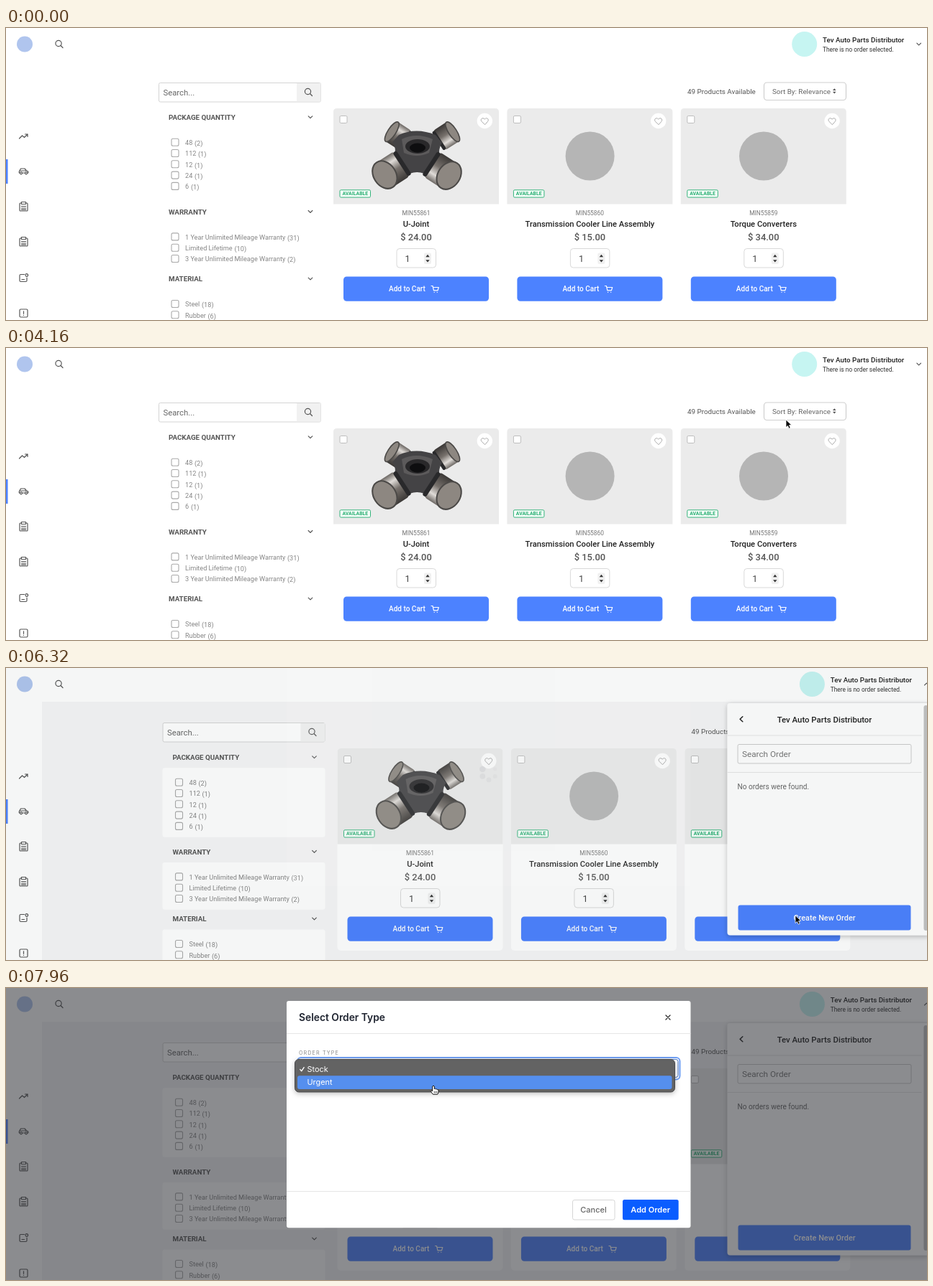
Recreate the animation shown at these times as an HTML page. Size 1280 by 407 pixels, loop 8 s.

```html
<!DOCTYPE html>
<html lang="en">
<head>
<meta charset="utf-8">
<title>Order type selection</title>
<style>
  html, body { margin: 0; height: 100%; overflow: hidden; background: #fff; }
  svg { display: block; width: 100%; height: 100%; }
  text { font-family: Roboto, sans-serif; white-space: pre; }
  .inter { font-family: Inter, sans-serif; }
  .line { fill: none; stroke: #555; stroke-width: 1.2; stroke-linecap: round; stroke-linejoin: round; }
</style>
</head>
<body>
<svg id="stage" viewBox="0 0 1280 407" xmlns="http://www.w3.org/2000/svg"></svg>
<script>
const LOOP = 8000, FRAME = 40;
const BLUE = '#4c82ff';
const COMPANY = 'Tev Auto Parts Distributor';

// Text is placed by the vertical centre of its capitals.
const text = (x, y, size, str, { fill = '#555', w = 400, at = 'start', cls = '', gap = 0 } = {}) =>
  `<text class="${cls}" x="${x}" y="${y + size * .355}" font-size="${size}" font-weight="${w}" fill="${fill}" text-anchor="${at}" letter-spacing="${gap}">${str}</text>`;
const rect = (x, y, w, h, fill, r = 0, stroke = 'none', sw = 1) =>
  `<rect x="${x}" y="${y}" width="${w}" height="${h}" rx="${r}" fill="${fill}" stroke="${stroke}" stroke-width="${sw}"/>`;
const line = (d, x = 0, y = 0, attrs = '') => `<path class="line" d="${d}" transform="translate(${x} ${y})" ${attrs}/>`;
const circle = (x, y, r, fill, attrs = '') => `<circle cx="${x}" cy="${y}" r="${r}" fill="${fill}" ${attrs}/>`;
const group = (id, body, attrs = '') => `<g id="${id}" ${attrs}>${body}</g>`;

const chevron = (x, y) => line('M-2.8-1.4L0 1.4 2.8-1.4', x, y);
const magnifier = (x, y) => circle(x - 1, y - 1, 4.1, 'none', 'class="line"') + line('M2 2L5 5', x, y);

function sidebar() {
  const clipboard = 'M-3-5H-4.5Q-5.5-5-5.5-4V5Q-5.5 6-4.5 6H4.5Q5.5 6 5.5 5V-4Q5.5-5 4.5-5H3M-3-6.5H3V-3.5H-3ZM-3-.5H3M-3 2H3M-3 4.2H3';
  const icons = [
    [151, 'M-6 3L-2-1 1 1.5 5.5-3M2-3H5.5V.5'],
    [200, 'M-5 2H-6.2V0L-4-4H1.5L4-1Q6.3-.7 6.3 1V2H5M-2 2H2M-5.5-1H4M-5 2.3a1.5 1.5 0 1 0 3 0a1.5 1.5 0 1 0-3 0M2 2.3a1.5 1.5 0 1 0 3 0a1.5 1.5 0 1 0-3 0'],
    [249, clipboard], [298, clipboard],
    [348, 'M1-4.5H-4Q-5.5-4.5-5.5-3V4Q-5.5 5.5-4 5.5H3Q4.5 5.5 4.5 4V0M2.5-3.5a1.8 1.8 0 1 0 3.6 0a1.8 1.8 0 1 0-3.6 0M-2.5 2.5H1'],
    [397.5, 'M-4-5.5H4Q5.5-5.5 5.5-4V4Q5.5 5.5 4 5.5H-4Q-5.5 5.5-5.5 4V-4Q-5.5-5.5-4-5.5ZM0-2.7V.8M0 2.8V2.9'],
  ];
  return rect(0, 47, 50, 360, '#fff') + rect(0, 183, 2.5, 34, BLUE) +
    icons.map(([y, d]) => line(d, 24.5, y)).join('');
}

function filters() {
  const section = (y, title, items) => {
    const first = y + 35;
    return rect(212, y + 14.5, 226, items.length * 15.3 + 20, '#fff', 3) +
      text(226, y, 9.75, title, { w: 700 }) + chevron(423, y - .5) +
      items.map(([name, count, width], i) => {
        const row = first + i * 15.3;
        return rect(230, row - 5.5, 10, 10, '#fff', 2, '#aaa', 1.1) +
          text(249, row, 9.15, name, { fill: '#858585' }) +
          text(249 + width, row + 1, 9.15, `(${count})`, { fill: '#858585' });
      }).join('');
  };
  return rect(212.5, 76.5, 225, 26.5, '#fff', 2, '#d4d4d4') + rect(404, 77, 33.5, 25.5, '#f1f1f1') +
    text(218.5, 90, 11.3, 'Search...', { fill: '#666' }) + magnifier(420.5, 89.5) +
    section(124.7, 'PACKAGE QUANTITY', [['48', 2, 13], ['112', 1, 18], ['12', 1, 13], ['24', 1, 13], ['6', 1, 8]]) +
    section(256.4, 'WARRANTY', [['1 Year Unlimited Mileage Warranty', 31, 142], ['Limited Lifetime', 10, 68.5], ['3 Year Unlimited Mileage Warranty', 2, 142]]) +
    section(350, 'MATERIAL', [['Steel', 18, 23], ['Rubber', 6, 31.5]]);
}

// A simplified metal cross joint.
function joint() {
  const cap = (x, y, turn, s, face) => `<g transform="translate(${x} ${y}) rotate(${turn}) scale(${s})">
    ${rect(-13, -20, 31, 40, 'url(#steel)', 5)}${rect(15, -19, 6, 38, '#29292b', 3)}
    <ellipse cx="-10" rx="${face}" ry="20" fill="#8d8781" stroke="#4b4947" stroke-width="2"/></g>`;
  return cap(543, 149, 33, .8, 7) + cap(614, 149, 147, .8, 7) +
    `<path d="M546 149Q570 138 597 149L606 160Q598 172 606 190L590 208Q572 194 551 208L534 188Q546 171 537 159Z" fill="#444345"/>
     <path d="M550 155Q570 145 593 155L588 174Q571 182 553 174Z" fill="#5c5a5b"/>
     <ellipse cx="572" cy="165" rx="17" ry="10" fill="#29282a"/><ellipse cx="572" cy="167" rx="11" ry="6.5" fill="#0e0e10"/>` +
    cap(535, 199, -33, 1.03, 15) + cap(607, 200, 213, 1.03, 15);
}

function product(i, code, name, price) {
  const cart = 'M-5-4.5H-3L-1.5 1.8H4L5.3-2.5H-2.5M-.8 4.3V4.4M3.3 4.3V4.4';
  const picture = i ? circle(115.2, 66.5, 34, '#b5b5b5') : `<g transform="translate(-455 -112)">${joint()}</g>`;
  const c = 115;
  return `<g transform="translate(${455 + i * 241.4} 112)">
    ${rect(0, 0, 230, 282, '#fff', 5)}
    <path d="M0 133.5V5Q0 0 5 0H225Q230 0 230 5V133.5Z" fill="#ebebeb"/>${picture}
    ${rect(9, 10.5, 10, 10, '#fff', 1.5, '#bdbdbd')}
    ${circle(210.3, 17.5, 10.7, '#fff')}
    ${line('M0 4.5L-4.2.3C-7-3-2.5-6.2 0-2.8 2.5-6.2 7-3 4.2.3Z', 210.3, 18, 'style="stroke:#aaa;stroke-width:1"')}
    ${rect(9, 113.8, 42.5, 10.2, '#f7fffa', 1.5, '#32b27a')}
    ${text(30.3, 119, 6.9, 'AVAILABLE', { fill: '#27ae72', w: 700, at: 'middle' })}
    ${text(c, 146, 8.4, code, { fill: '#777', at: 'middle' })}
    ${text(c, 161, 11.2, name, { fill: '#222', w: 500, at: 'middle' })}
    ${text(c, 179.8, 12.9, price, { w: 500, at: 'middle' })}
    ${rect(88, 195.5, 54.5, 26.5, '#fff', 4, '#d9d9d9')}
    ${text(99.5, 209.5, 12.6, '1', { fill: '#444' })}
    ${rect(126, 201.5, 10, 15.5, '#f0f0f0', 2)}
    <path d="M128.3 207.2L131 203.8 133.7 207.2ZM128.3 211.2L131 214.6 133.7 211.2Z" fill="#333"/>
    ${rect(14, 234.5, 202, 34.3, BLUE, 4.5)}
    ${text(102.5, 251.2, 10, 'Add to Cart', { fill: '#fff', w: 500, at: 'middle' })}
    ${line(cart, 141, 252, 'style="stroke:#fff"')}</g>`;
}

function catalogue() {
  return filters() + text(947, 88.5, 9.83, '49 Products Available') +
    rect(1053.5, 76, 114, 24.5, '#fff', 4, '#cfcfcf', 1.2) +
    text(1065, 88.5, 9.85, 'Sort By: Relevance', { fill: '#666' }) +
    '<path d="M1149 87L1151.3 84.3 1153.6 87ZM1149 88.7L1151.3 91.4 1153.6 88.7Z" fill="#555"/>' +
    product(0, 'MIN55861', 'U-Joint', '$ 24.00') +
    product(1, 'MIN55860', 'Transmission Cooler Line Assembly', '$ 15.00') +
    product(2, 'MIN55859', 'Torque Converters', '$ 34.00');
}

const account = () => circle(1109.7, 22.5, 17.5, '#c6f5f2') +
  text(1135, 16.8, 9.8, COMPANY, { fill: '#222', w: 500 }) +
  text(1135, 30.5, 8.4, 'There is no order selected.', { fill: '#333' }) +
  group('caret', line('M-2.8-1.4L0 1.4 2.8-1.4'));

const ordersPanel = () => rect(992, 49, 281, 323.5, '#fff', 4) +
  rect(1265, 52, 6, 314, '#c2c2c2', 3) +
  line('M2-3.5L-1.7 0 2 3.5', 1011.3, 71.3, 'style="stroke:#222;stroke-width:1.5"') +
  text(1127, 71.5, 11.4, COMPANY, { fill: '#222', w: 500, at: 'middle' }) +
  rect(992, 93.5, 270, 1, '#e6e6e6') + rect(1006.5, 106.5, 241, 26.5, '#fff', 2, '#ccc') +
  text(1012.5, 120, 11.75, 'Search Order', { fill: '#777' }) + rect(992, 145, 270, 1, '#e6e6e6') +
  text(1006, 165, 10.1, 'No orders were found.', { fill: '#666' }) +
  rect(1007, 330.5, 240, 35, BLUE, 3) +
  text(1127, 348, 10.9, 'Create New Order', { fill: '#fff', w: 500, at: 'middle' });

function modal() {
  const inter = { cls: 'inter' };
  const form = text(407, 41, 13.8, 'Select Order Type', { ...inter, fill: '#1f2430', w: 600 }) +
    line('M-3-3L3 3M3-3L-3 3', 920, 41, 'style="stroke:#333;stroke-width:1.4"') +
    rect(390, 63, 561.5, 1, '#e6e6e6') + rect(390, 283, 561.5, 1, '#e6e6e6') +
    text(407, 90.3, 7.2, 'ORDER TYPE', { ...inter, fill: '#888', gap: 1.1 }) +
    rect(407.5, 99.5, 526.5, 25, '#fff', 3, '#c8cedb') +
    group('ring', rect(405, 97, 531.5, 30.5, 'none', 5, '#6f9ff5', 2) + rect(407.5, 99.5, 526.5, 25, 'none', 3, '#5b83c9')) +
    text(418, 112.5, 10.9, 'Stock', { ...inter, fill: '#444' }) + chevron(923, 112) +
    rect(787.5, 295.5, 58.5, 27.5, '#fff', 2.5, '#d6d6d6') +
    text(816.5, 309.5, 11, 'Cancel', { ...inter, fill: '#666', w: 500, at: 'middle' }) +
    rect(857, 295, 77.7, 28.3, '#0a5dff', 2.5) +
    text(895.7, 309.5, 11, 'Add Order', { ...inter, fill: '#fff', w: 600, at: 'middle' });
  const list = rect(401.5, 99.5, 528, 45.5, '#636364', 5.5, '#4a4a4b') +
    `<rect id="pick" x="405" width="520.5" height="18.8" rx="3" fill="#558fee"/>` +
    line('M-2.5.3L-.6 2.5 2.8-2.6', 411.3, 113.3, 'style="stroke:#fff;stroke-width:1.4"') +
    text(418.5, 113, 10.9, 'Stock', { ...inter, fill: '#fff' }) +
    text(418.5, 131.5, 10.9, 'Urgent', { ...inter, fill: '#fff' });
  const dots = Array.from({ length: 6 }, (_, i) =>
    circle(671 + 10 * Math.sin(i * Math.PI / 3), 176 - 10 * Math.cos(i * Math.PI / 3), 2, '#65657a', 'class="dot"')).join('');
  return rect(390, 18, 561.5, 316.3, '#fff', 3) + group('spinner', dots) + group('form', form) +
    group('list', list, 'filter="url(#shadow)"');
}

const IBEAM = 'M-2.5-5.5Q0-5.5 0-4Q0-5.5 2.5-5.5M0-4V4.5M-2.5 6Q0 6 0 4.5Q0 6 2.5 6M-1.3 1.5H1.3';
const pointers = group('arrow', '<path d="M0 0V10.6L2.5 8.4 4.2 12.2 6.2 11.3 4.5 7.6 7.8 7.4Z" fill="#000" stroke="#fff" stroke-width=".8"/>') +
  group('ibeam', `<path d="${IBEAM}" fill="none" stroke="#fff" stroke-width="2.4"/><path d="${IBEAM}" fill="none" stroke="#111" stroke-width="1.1"/>`) +
  group('hand', '<path d="M-1.3 1Q0-.8 1.3 1V4.6Q2.6 3.7 3.6 5Q4.8 4.4 5.6 5.7Q7.2 5.4 7.2 7Q7.2 10 5.8 12.2H-.6Q-2.6 9.8-3.8 7.5Q-3.6 6-1.3 7.6Z" fill="#fff" stroke="#111" stroke-width="1"/><path d="M1.2 8V10.4M3 8V10.4M4.8 8V10.4" stroke="#111" stroke-width=".7"/>');

const stage = document.getElementById('stage');
stage.innerHTML = `<defs>
  <linearGradient id="steel" x2="0" y2="1"><stop stop-color="#6d6864"/><stop offset=".25" stop-color="#e0dcd8"/><stop offset=".55" stop-color="#77716c"/><stop offset="1" stop-color="#3b3836"/></linearGradient>
  <filter id="shadow" x="-10%" y="-20%" width="120%" height="150%"><feDropShadow dx="0" dy="2" stdDeviation="3.5" flood-opacity=".25"/></filter>
</defs>` +
  group('backdrop', rect(0, 0, 1280, 407, 'inherit')) +
  group('main', catalogue()) + rect(0, 0, 1280, 47, '#fff') + sidebar() +
  circle(26, 22.5, 11, '#b0c5ee') + magnifier(74, 22.5) +
  group('account', account()) + group('panel', ordersPanel(), 'filter="url(#shadow)"') +
  group('dim', rect(0, 0, 1280, 407, '#2a2b30')) +
  group('modal', modal()) + group('cursor', pointers);

const el = {};
stage.querySelectorAll('[id]').forEach(node => el[node.id] = node);
const dots = stage.querySelectorAll('.dot');

const show = (node, on) => node.style.display = on ? '' : 'none';
const move = (node, x, y) => node.setAttribute('transform', `translate(${x} ${y})`);
const smooth = p => p * p * (3 - 2 * p);
const linear = p => p;

// Each step is [time, ...values].
function sample(steps, t, ease = linear) {
  const i = steps.findIndex(s => s[0] > t);
  if (i === 0) return steps[0].slice(1);
  if (i < 0) return steps[steps.length - 1].slice(1);
  const a = steps[i - 1], b = steps[i], p = ease((t - a[0]) / (b[0] - a[0]));
  return a.slice(1).map((v, k) => v + (b[k + 1] - v) * p);
}

const PATH = [[1000, 664, 402], [1760, 554, 294], [3660, 554, 294], [4160, 1084, 100], [4480, 1198, 25],
  [4960, 1200, 27], [5320, 1180, 83], [6140, 1097, 345], [6320, 1097, 345]];
const PATH_TO_FORM = [[6320, 1097, 345], [6400, 983, 301], [6920, 611, 117], [7520, 611, 117], [7880, 594, 136]];
const FADE = [[6280, 0], [6320, .08], [6400, .9], [6440, 1]];
const DIM = .54;
const OPEN_PANEL = 4880, LOCK_SCROLL = 6280, FORM_READY = 6760, OPEN_LIST = 7440, PICK_URGENT = 7680;

function render(t) {
  const locked = t >= LOCK_SCROLL, panelOpen = t >= OPEN_PANEL;
  el.backdrop.setAttribute('fill', locked ? '#f6f6f7' : '#fff');
  move(el.main, locked ? 5.5 : 0, 0);
  move(el.account, locked ? 10.7 : 0, 0);
  move(el.panel, locked ? 10.5 : 0, 0);
  el.caret.setAttribute('transform', `translate(1268.7 22.5) scale(1 ${panelOpen ? -1 : 1})`);
  show(el.panel, panelOpen);

  const [fade] = sample(FADE, t);
  el.dim.setAttribute('opacity', fade * DIM);
  el.modal.setAttribute('opacity', fade);
  show(el.modal, fade > 0);
  const slide = Math.min(1, Math.max(0, (t - 6255) / 300));
  move(el.modal, 0, -49 * (1 - slide) ** 2);
  show(el.spinner, t < FORM_READY);
  show(el.form, t >= FORM_READY);
  show(el.ring, t >= OPEN_LIST);
  show(el.list, t >= OPEN_LIST);
  el.pick.setAttribute('y', t < PICK_URGENT ? 103.6 : 122.3);

  const head = (t - 6400) / 130;
  dots.forEach((dot, i) => {
    const age = (((head - i) % 6) + 6) % 6;
    dot.setAttribute('r', 4.4 - age * .42);
    dot.setAttribute('opacity', 1 - age * .15);
  });

  show(el.cursor, t >= 1000);
  move(el.cursor, ...(t < 6320 ? sample(PATH, t, smooth) : sample(PATH_TO_FORM, t)));
  const kind = t >= 1640 && t < 3720 ? 'ibeam' : t >= 7040 ? 'hand' : 'arrow';
  for (const name of ['arrow', 'ibeam', 'hand']) show(el[name], name === kind);
}

const start = performance.now();
function tick(now) {
  const t = Math.max(0, now - start) % LOOP;
  render(t - t % FRAME);
  requestAnimationFrame(tick);
}
render(0);
requestAnimationFrame(tick);
</script>
</body>
</html>
```
